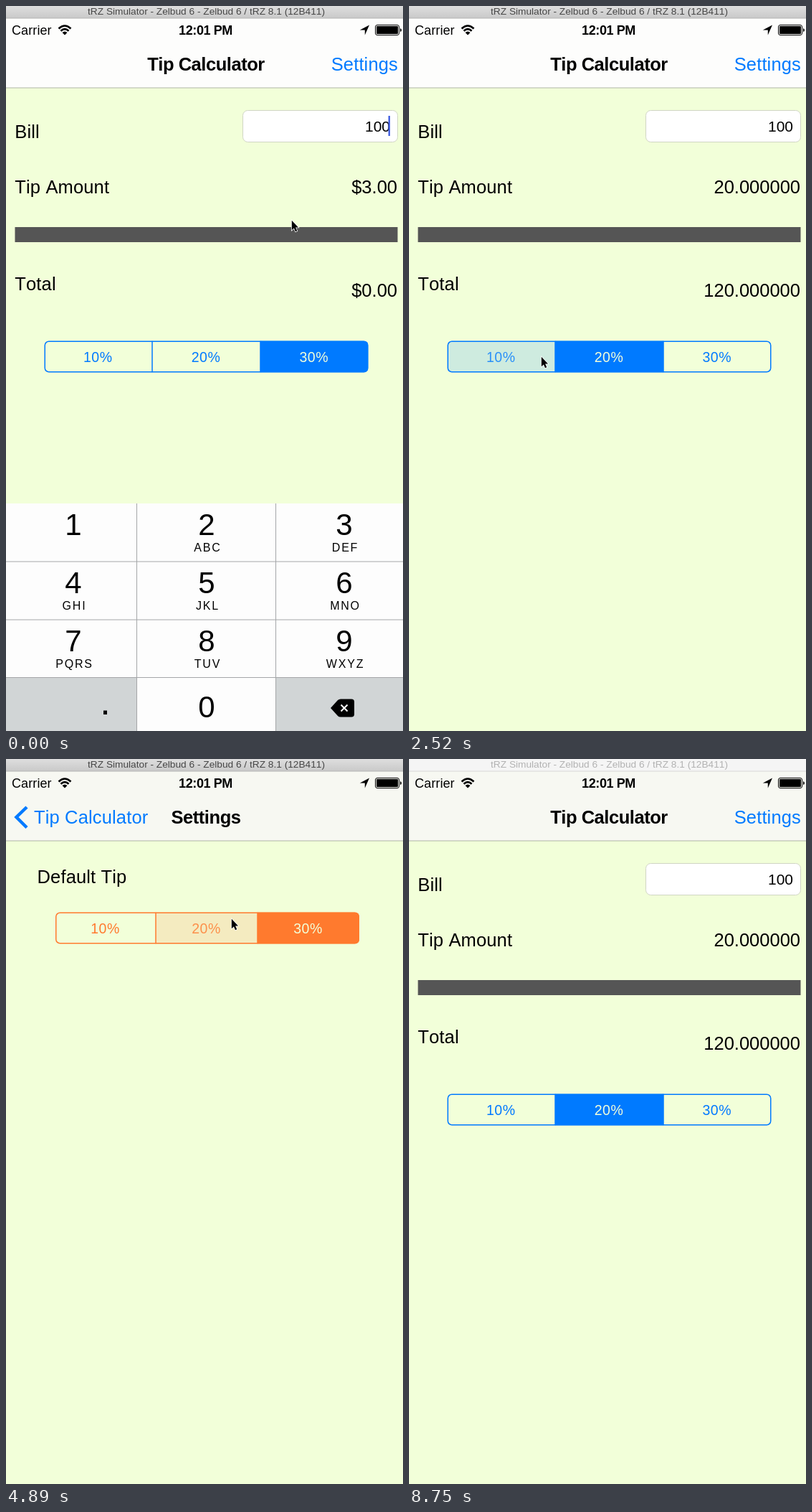
Write an HTML page that moves like this. It is 554 px wide and 1010 px high and loops after 8.85 s.

```html
<!DOCTYPE html>
<html lang="en">
<head>
<meta charset="utf-8">
<title>Tip Calculator</title>
<style>
  html, body { margin: 0; width: 100%; height: 100%; overflow: hidden; background: #f2ffd9; }
  svg {
    display: block; width: 554px; height: 1010px;
    font: 25.5px "Liberation Sans", Arial, sans-serif; font-kerning: none; letter-spacing: .15px;
  }
  .bold { font-weight: bold; letter-spacing: -.45px; }
  .number { letter-spacing: 0; }
  .field { font-size: 21px; letter-spacing: 0; }
  .segment { font-size: 19.5px; letter-spacing: .5px; }
  .status { font-size: 18px; letter-spacing: .1px; }
  .clock { font-size: 18px; font-weight: bold; letter-spacing: -.4px; }
  .digit { font-size: 42px; letter-spacing: 0; }
  .letters { font-size: 16px; letter-spacing: 1.8px; }
  .window { font-size: 13.7px; letter-spacing: 0; }
</style>
</head>
<body>
<svg id="stage" viewBox="0 0 554 1010">
  <defs>
    <linearGradient id="chrome" x2="0" y2="1">
      <stop stop-color="#dedede"/><stop offset="1" stop-color="#c9c9c9"/>
    </linearGradient>
  </defs>
  <g id="scene"></g>
</svg>
<script>
const DURATION = 8850, WIDTH = 554, KEYBOARD_TOP = 693;
const PAPER = '#f2ffd9', BLUE = '#007aff', ORANGE = '#ff7a2e';

const START = {
  time: 0, x: 398, y: 298, keyboard: 0, editing: true, tip: '$3.00', total: '$0.00',
  picked: 2, pressed: -1, preset: 2, presetPressed: -1,
  slide: WIDTH, nav: '#fdfdfc', settingsFade: 1, backFade: 1, active: true
};

// Each step: time, pointer x, pointer y, other changes.
const STEPS = [
  [300, 398, 298, { keyboard: 75, editing: false, tip: '30.000002', total: '130.000000' }],
  [450, 398, 298, { keyboard: 285 }],
  [590, 398, 298, { keyboard: 317 }],
  [740, 385, 325],
  [890, 346, 395],
  [1190, 316, 448],
  [1340, 296, 481],
  [1480, 287, 496, { pressed: 1 }],
  [1630, 287, 496, { pressed: -1, picked: 1, tip: '20.000000', total: '120.000000' }],
  [1780, 276, 499],
  [1930, 236, 496],
  [2070, 198, 490],
  [2220, 184, 488],
  [2520, 184, 488, { pressed: 0 }],
  [2670, 184, 488, { pressed: -1, picked: 0, tip: '10.000000', total: '110.000000' }],
  [2810, 200, 466],
  [2960, 268, 372],
  [3110, 362, 244],
  [3260, 440, 140],
  [3400, 482, 91],
  [3550, 488, 83, { settingsFade: .3 }],
  [3700, 488, 83, { slide: 215, nav: '#f7f8f2', settingsFade: 1 }],
  [3850, 488, 83, { slide: 26 }],
  [4000, 488, 83, { slide: 0 }],
  [4150, 468, 100],
  [4290, 396, 163],
  [4440, 332, 213],
  [4590, 314, 222],
  [4890, 314, 222, { presetPressed: 1 }],
  [5040, 314, 222, { presetPressed: -1, preset: 1 }],
  [5340, 276, 186],
  [5490, 165, 98],
  [5630, 121, 75],
  [5930, 121, 75, { backFade: .3 }],
  [6070, 121, 75, { slide: 340, backFade: 1, picked: 1, tip: '20.000000', total: '120.000000' }],
  [6220, 121, 75, { slide: 528 }],
  [6370, 121, 75, { slide: 552 }],
  [6520, 121, 75, { slide: WIDTH }],
  [7860, 190, 330],
  [8010, 338, 965],
  [8160, null, null],
  [8750, null, null, { active: false }]
];

const states = [START];
for (const [time, x, y, changes] of STEPS) {
  states.push({ ...states[states.length - 1], time, x, y, ...changes });
}

const text = (x, y, content, { cls = '', anchor = 'start', fill = '#000', opacity = 1 } = {}) =>
  `<text x="${x}" y="${y}" class="${cls}" text-anchor="${anchor}" fill="${fill}" opacity="${opacity}">${content}</text>`;
const rect = (x, y, w, h, fill, extra = '') =>
  `<rect x="${x}" y="${y}" width="${w}" height="${h}" fill="${fill}" ${extra}/>`;
const path = (d, extra = '') => `<path d="${d}" ${extra}/>`;
const shift = (x, y, content) => `<g transform="translate(${x} ${y})">${content}</g>`;

function segments(id, edges, top, color, picked, pressed) {
  const left = edges[0], width = edges[3] - left, height = 44;
  let fills = '', labels = '';
  ['10%', '20%', '30%'].forEach((label, i) => {
    const x = edges[i], w = edges[i + 1] - x;
    if (i === picked) fills += rect(x, top, w, height, color);
    if (i === pressed) fills += rect(x, top, w, height, color, 'opacity=".15"');
    labels += text(x + w / 2 - .5, top + 29, label, {
      cls: 'segment', anchor: 'middle', fill: i === picked ? PAPER : color, opacity: i === pressed ? .8 : 1
    });
  });
  const lines = path(`M${edges[1]} ${top}v${height}M${edges[2]} ${top}v${height}`, `stroke="${color}" stroke-width="1.5"`);
  return `<clipPath id="${id}">${rect(left, top, width, height, '#000', 'rx="6"')}</clipPath>
    <g clip-path="url(#${id})">${fills}${lines}</g>` +
    rect(left + .75, top + .75, width - 1.5, height - 1.5, 'none', `rx="5.5" stroke="${color}" stroke-width="1.5"`) + labels;
}

function calculator(s) {
  const value = (y, content) => text(546, y, content, { cls: 'number', anchor: 'end' });
  return rect(0, 114, WIDTH, 896, PAPER) +
    text(12.3, 184, 'Bill') + text(12.3, 261, 'Tip Amount') + text(12.3, 396, 'Total') +
    rect(330.5, 145.5, 216, 44, '#fff', 'rx="7" stroke="#d0d5c4"') +
    text(536, 175, '100', { cls: 'field', anchor: 'end' }) +
    (s.editing ? rect(533.5, 153, 2.5, 28, '#4864e2') : '') +
    value(261, s.tip) + value(405, s.total) +
    rect(12.5, 308, 534, 21, '#555') +
    segments('tipClip', [53.5, 204, 355, 505.5], 466.5, BLUE, s.picked, s.pressed);
}

function settings(s) {
  return rect(0, 114, WIDTH, 896, PAPER) + text(43.5, 173, 'Default Tip') +
    segments('presetClip', [69, 209, 351, 493], 213.5, ORANGE, s.preset, s.presetPressed);
}

function navigation(s) {
  const shown = 1 - s.slide / WIDTH, hidden = 1 - shown;
  const backOpacity = shown ** 25 * s.backFade;
  return rect(0, 17, WIDTH, 97, s.nav) + rect(0, 113.5, WIDTH, 1, '#b0b5a8') +
    text(279 - 158 * shown, 90, 'Tip Calculator', { cls: 'bold', anchor: 'middle', opacity: hidden ** 2 }) +
    text(547, 90, 'Settings', { anchor: 'end', fill: BLUE, opacity: hidden * s.settingsFade }) +
    text(279 + s.slide / 2, 90, 'Settings', { cls: 'bold', anchor: 'middle', opacity: shown }) +
    text(39 + 110 * hidden, 90, 'Tip Calculator', { fill: BLUE, opacity: backOpacity }) +
    path('M29 67L14.5 81L29 95.5', `fill="none" stroke="${BLUE}" stroke-width="4.5" opacity="${backOpacity}"`);
}

function statusBar() {
  return text(8, 40, 'Carrier', { cls: 'status' }) +
    text(278.5, 40, '12:01 PM', { cls: 'clock', anchor: 'middle' }) +
    path('M73.5 31.5Q82 23.5 90.5 31.5M76.5 34.8Q82 29.5 87.5 34.8', 'fill="none" stroke="#000" stroke-width="2.6"') +
    path('M82 40.5L78.5 37Q82 34 85.5 37Z') +
    path('M507 26.5L500.8 40.5V33.5H493.8Z') +
    rect(515.5, 26.5, 33, 14, 'none', 'rx="2.5" stroke="#000"') +
    rect(517, 28, 30, 11, '#000', 'rx="1"') +
    path('M550 31q2 .5 2 2.5t-2 2.5z');
}

function keyboard() {
  const centers = [94, 280, 472];
  const letters = ['', 'ABC', 'DEF', 'GHI', 'JKL', 'MNO', 'PQRS', 'TUV', 'WXYZ'];
  const keys = letters.map((label, i) => {
    const x = centers[i % 3], y = Math.floor(i / 3) * 81;
    return text(x, 44 + y, i + 1, { cls: 'digit', anchor: 'middle' }) +
      text(x + 1.5, 67 + y, label, { cls: 'letters', anchor: 'middle' });
  }).join('');
  return rect(0, 0, WIDTH, 317, '#fdfdfd') +
    rect(0, 243, 182, 74, '#d1d5d6') + rect(376, 243, 178, 74, '#d1d5d6') +
    path('M0 81H554M0 162H554M0 242.5H554M182.5 0V317M376.5 0V317', 'stroke="#a4a6a8"') +
    keys + text(280, 298, '0', { cls: 'digit', anchor: 'middle' }) +
    rect(136, 288.5, 5, 5.5, '#000') +
    path('M453 285L463 274Q464.5 272.5 467 272.5H482Q486 272.5 486 276.5V293.5Q486 297.5 482 297.5H467Q464.5 297.5 463 296Z') +
    path('M467.5 280.5l9 9m0-9l-9 9', 'stroke="#fff" stroke-width="2"');
}

function windowBar(active) {
  return rect(0, 0, WIDTH, 17, active ? 'url(#chrome)' : '#f5f5f5') +
    rect(0, 16.5, WIDTH, 1, active ? '#b5b5b5' : '#d8d8d8') +
    text(279.5, 12, 'tRZ Simulator - Zelbud 6 - Zelbud 6 / tRZ 8.1 (12B411)', {
      cls: 'window', anchor: 'middle', fill: active ? '#464646' : '#b2b2b2'
    });
}

const pointer = path('M.8 .8V14.3L3.9 11.4L6 16.2L8.2 15.3L6.1 10.6H10Z',
  'stroke="#fff" stroke-width="1.5" paint-order="stroke"');

function render(s) {
  const shown = 1 - s.slide / WIDTH;
  let scene = shift(-166 * shown, 0, calculator(s));
  if (shown > 0) {
    scene += rect(0, 114, WIDTH, 896, '#000', `opacity="${.1 * shown}"`) + shift(s.slide, 0, settings(s));
  }
  if (s.keyboard < 317) scene += shift(0, KEYBOARD_TOP + s.keyboard, keyboard());
  scene += navigation(s) + statusBar() + windowBar(s.active);
  if (s.x !== null) scene += shift(s.x, s.y, pointer);
  document.getElementById('scene').innerHTML = scene;
}

let current;
const origin = performance.now();
function tick() {
  const time = (performance.now() - origin) % DURATION;
  const next = states.findLast(s => s.time <= time);
  if (next !== current) render(current = next);
  requestAnimationFrame(tick);
}
tick();
</script>
</body>
</html>
```
